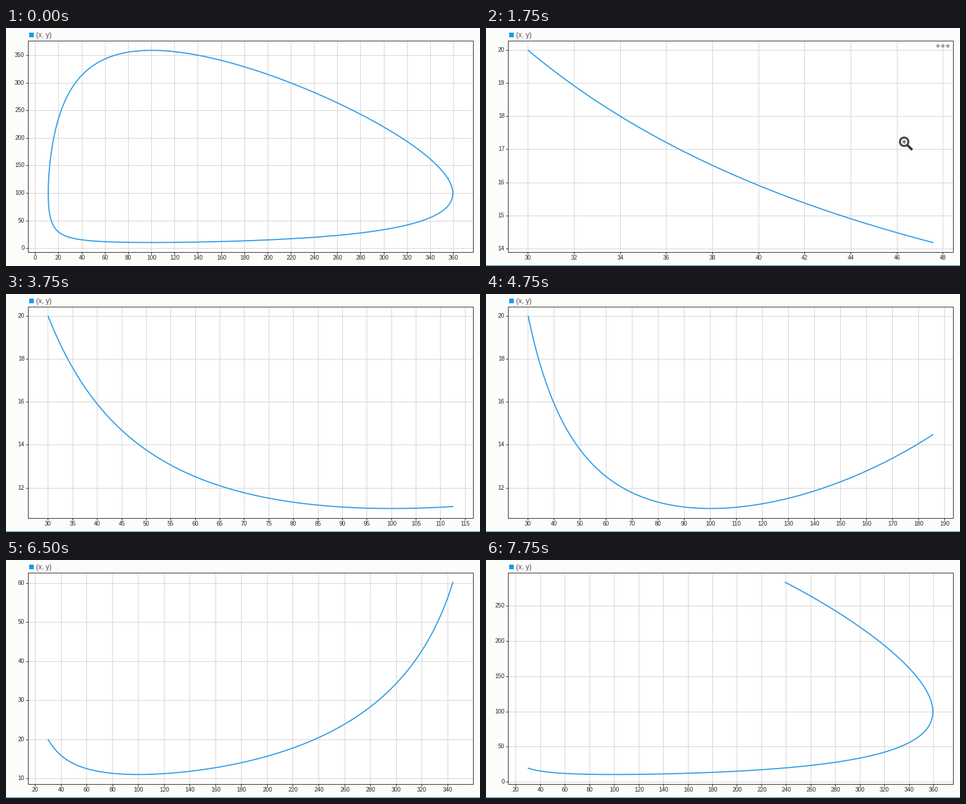
Animation, 819 px wide and 411 px high, one loop 8 s. Source, as a matplotlib script:

```python
import math

import numpy as np
import matplotlib.pyplot as plt
from matplotlib.animation import FuncAnimation
from matplotlib.patches import Circle, Rectangle

W, H = 819, 411
STEP_MS, FRAMES = 250, 32
LEFT, RIGHT, TOP, BOTTOM = 38, 807, 22, 387    # plot frame, px
MIN_GAP = 40             # least distance between ticks, px
RUN_START = 700          # the old curve stays until the new run begins
BLUE, GRID, DARK = "#339fe8", "#d2d2d2", "#222222"
FONT = "Liberation Sans"


def slope(p):
    """Predator and prey with both rates equal to one."""
    x, y = p
    return np.array([x * (1 - y / 100), y * (x / 100 - 1)])


def integrate(dt=0.005, end=9.0):
    pts = [np.array([30.0, 20.0])]
    for _ in range(int(end / dt)):
        p = pts[-1]
        k1 = slope(p)
        k2 = slope(p + dt / 2 * k1)
        k3 = slope(p + dt / 2 * k2)
        k4 = slope(p + dt * k3)
        pts.append(p + dt / 6 * (k1 + 2 * k2 + 2 * k3 + k4))
    return np.array(pts)


# One closed orbit
path = integrate()
half = 900
closing = half + np.argmin(np.hypot(*(path[half:] - path[0]).T))
path = path[:closing + 1]
order = np.arange(len(path))

# Progress of the run: path index reached at a few clock times
peak = np.argmax(path[:half, 0])
marks = np.interp([47.55, 74.1, 112.5, 262.5, 344], path[:peak, 0], order[:peak])
last = peak + np.argmax(path[peak:, 1] >= 282.5)
clock = [RUN_START, 1750, 2750, 3750, 5500, 6500, 7750]
reached = [0, *marks, last]

fig = plt.figure(figsize=(W / 72, H / 72), dpi=72, facecolor="#fcfdfb")
ax = fig.add_axes([0, 0, 1, 1])


def visible_curve(ms):
    if ms < RUN_START:
        return path
    end = np.interp(ms, clock, reached)
    tip = [np.interp(end, order, path[:, k]) for k in (0, 1)]
    return np.vstack([path[:int(end) + 1], tip])


def make_scale(values, a, b):
    """Return the pixel mapping and the padded value range for one axis."""
    lo, hi = values.min(), values.max()
    pad = 0.05 * (hi - lo)
    lo, hi = lo - pad, hi + pad
    return (lambda v: a + (v - lo) / (hi - lo) * (b - a)), lo, hi


def ticks(lo, hi, length):
    least = MIN_GAP * (hi - lo) / length
    unit = 10.0 ** math.floor(math.log10(least))
    step = next(m * unit for m in (1, 2, 5, 10) if m * unit >= least)
    digits = max(0, -math.floor(math.log10(step) + 1e-9))
    for k in range(math.ceil(lo / step), math.floor(hi / step) + 1):
        yield k * step, f"{k * step:.{digits}f}"


def line(xs, ys, color, width=1, z=2, **kw):
    # Coordinates are already on pixel centres, so snapping would shift them.
    ax.plot(xs, ys, color=color, lw=width, zorder=z, snap=False, **kw)


def label(x, y, text, size=10, color=DARK, ha="center"):
    ax.text(x, y, text, fontsize=size, color=color, ha=ha, va="baseline", family=FONT)


def draw_chart(curve):
    left, right, top, bottom = (v + 0.5 for v in (LEFT, RIGHT, TOP, BOTTOM))
    ax.add_patch(Rectangle((LEFT, TOP), RIGHT - LEFT, BOTTOM - TOP, fc="white", lw=0, zorder=0))
    sx, x0, x1 = make_scale(curve[:, 0], LEFT, RIGHT)
    sy, y0, y1 = make_scale(curve[:, 1], BOTTOM, TOP)
    for v, text in ticks(x0, x1, RIGHT - LEFT):
        p = math.floor(sx(v)) + 0.5
        line([p, p], [top, bottom], GRID, z=1)
        line([p, p], [bottom, bottom + 3], DARK)
        label(p, 400.5, text)
    for v, text in ticks(y0, y1, BOTTOM - TOP):
        p = math.floor(sy(v)) + 0.5
        line([left, right], [p, p], GRID, z=1)
        line([left - 3, left], [p, p], DARK)
        label(32, p + 2.5, text, ha="right")
    line(sx(curve[:, 0]), sy(curve[:, 1]), BLUE, 2, 3, solid_joinstyle="round")
    line([left, right, right, left, left], [top, top, bottom, bottom, top], DARK, z=4)


def draw_legend():
    ax.add_patch(Rectangle((40, 8), 8, 8, fc="#139aff", lw=0))
    label(52, 16, "(x, y)", 12, "#4d4d4d", "left")


def draw_pointer(ms):
    """Zoom cursor and the menu dots shown while it hovers."""
    for x in (781, 789.5, 798):
        ax.add_patch(Circle((x, 31), 3, fc="#a2a2a2", lw=0, zorder=5))
    times = [1250, 1750, 2750]
    cx = np.interp(ms, times, [752, 722.5, 593.5])
    cy = np.interp(ms, times, [90, 196.5, 352])
    line([cx + 6, cx + 14], [cy + 6, cy + 14], "#333333", 4, 6, solid_capstyle="butt")
    ax.add_patch(Circle((cx, cy), 7.3, fc="white", ec="#444444", lw=3.4, zorder=7))
    line([cx - 3, cx + 3], [cy, cy], "#333333", 1.2, 8)
    line([cx, cx], [cy - 3, cy + 3], "#333333", 1.2, 8)


def draw(i):
    ms = i * STEP_MS
    ax.cla()
    ax.set_xlim(0, W)
    ax.set_ylim(H, 0)
    ax.axis("off")
    draw_chart(visible_curve(ms))
    draw_legend()
    if 1250 <= ms <= 2750:
        draw_pointer(ms)
    if ms >= 500:
        line([0, W], [H - 0.5, H - 0.5], "#2a86b0")
    return []


anim = FuncAnimation(fig, draw, frames=FRAMES, init_func=lambda: [],
                     interval=STEP_MS, repeat=True, repeat_delay=0)
plt.show()
```
